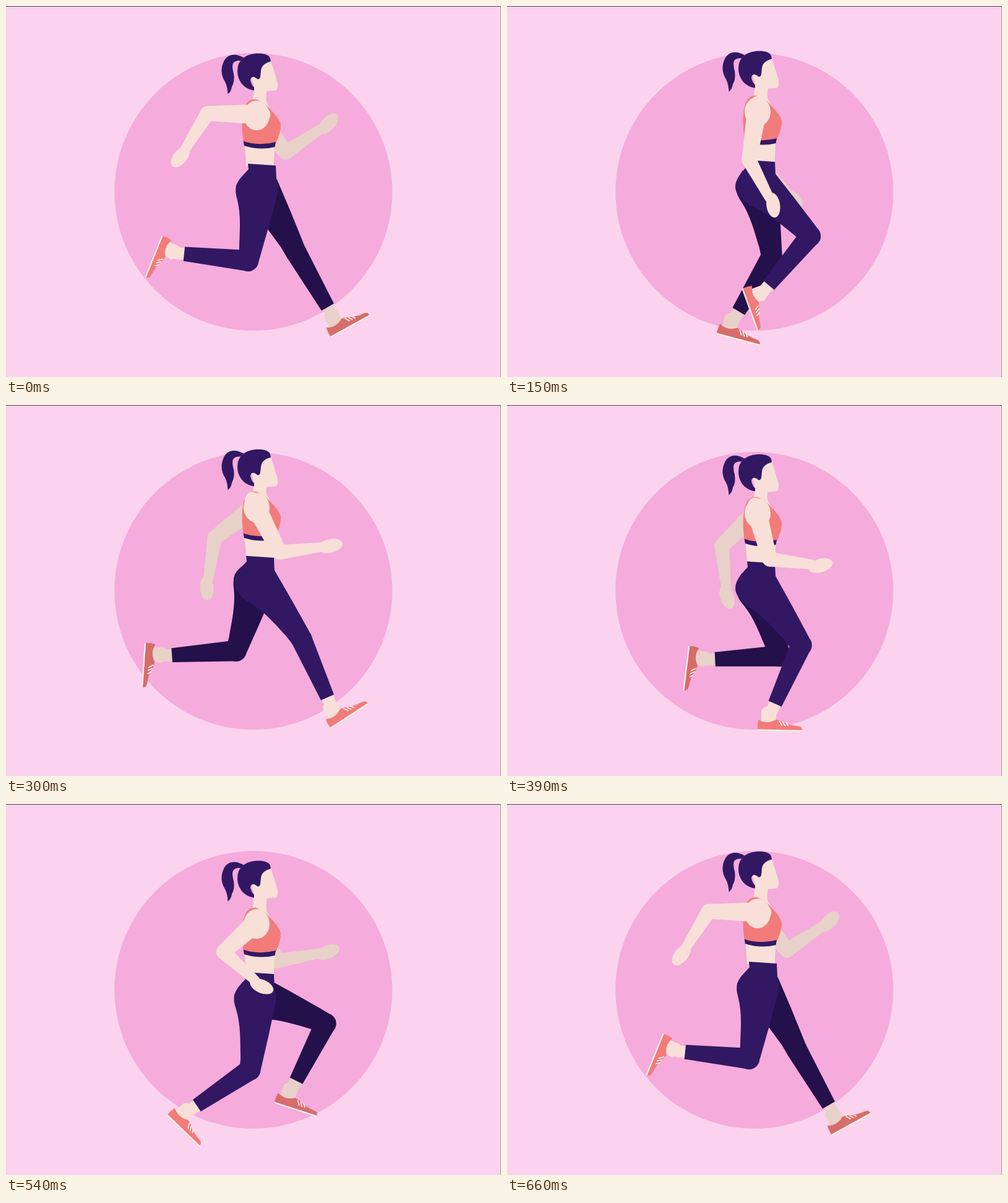
These frames come from a looping animation (800 by 600 pixels, 690 ms). An HTML page:

```html
<!DOCTYPE html>
<html lang="en">
<head>
<meta charset="utf-8">
<title>Runner</title>
<style>
html, body { margin: 0; width: 100%; height: 100%; overflow: hidden; background: #fcd3ee; }
svg { display: block; width: 800px; height: 600px; }
</style>
</head>
<body>
<svg id="stage" viewBox="0 0 800 600"></svg>
<script>
const STEP = 30, LOOP = 690, CYCLE = 22;
const NAVY = '#321863', DARK = '#24104b', CORAL = '#f17c79', CLAY = '#d66d6a',
      SKIN = '#f8e0d8', SHADE = '#e8d1c9', CREAM = '#fdf1ec';
const THIGH = 120, SHANK = 104, ANKLE = 124, FOREARM = 83;

// Key poses of one stride, in steps.
const KEYS = [0, 2, 5, 7, 10, 13, 18], N = KEYS.length;
const keyTime = i => KEYS[(i + N) % N] + CYCLE * Math.floor(i / N);

// Smooth periodic curve through one value per key pose; never overshoots.
function track(...values) {
  const value = i => values[(i + N) % N];
  const rise = i => (value(i + 1) - value(i)) / (keyTime(i + 1) - keyTime(i));
  const slope = i => {
    const a = rise(i - 1), b = rise(i);
    return a * b > 0 ? 2 * a * b / (a + b) : 0;
  };
  return t => {
    const i = KEYS.findLastIndex(k => k <= t);
    const h = keyTime(i + 1) - keyTime(i), u = (t - keyTime(i)) / h, w = 1 - u;
    return value(i) * w * w * (1 + 2 * u) + value(i + 1) * u * u * (3 - 2 * u)
      + h * u * w * (w * slope(i) - u * slope(i + 1));
  };
}

const wave = (t, peak) => Math.cos(2 * Math.PI * (t - peak) / CYCLE);

const headY = track(76.5, 85.5, 72.5, 68, 71.5, 79.5, 91.5);
const waistY = track(255, 273, 249, 241, 244, 253, 272);
const hipX = t => 405 + 3 * wave(t, 0) ** 12 * (wave(t, 0) > 0);

// Limb angles in degrees: 0 hangs down, positive swings forward. Feet: 0 is flat.
const nearLeg = {
  thigh: track(-8, -2, 45, 66, 37, 36, -5),
  shank: track(-96, -84, -40, -21, 24, -24, -56),
  foot: track(112, 110, 70, 20, -33, 1, 44)
};
const farLeg = {
  thigh: track(30, 47, 11, -4, -16, 17, 68),
  shank: track(30, -13, -31, -54, -86, -87, -27),
  foot: track(-29, 0, 15, 44, 94, 97, 18)
};
const nearArm = {
  upper: track(-91, -46, -9, 8, 27, 15, -48),
  fore: track(-32, -8, 28, 58, 97, 83, 48),
  wrist: t => 3 - 24 * wave(t, 4)
};
const farArm = {
  upper: track(38, 30, 1, -22, -53, -46, 29),
  fore: track(124, 97, 42, 20, -9, 6, 100),
  wrist: () => 13
};

const shape = (fill, d) => `<path fill="${fill}" d="${d}"/>`;
const line = (width, d) => `<path fill="none" stroke="${CREAM}" stroke-width="${width}" d="${d}"/>`;
const part = (id, body) => `<g id="${id}">${body}</g>`;
const taper = (fill, top, end, size) =>
  shape(fill, `M${-top},0 L${-end},${size} H${end} L${top},0Z`);

function legMarkup(id, pants, skin, shoe) {
  return part(id + 'Calf', taper(skin, 11, 9.5, ANKLE))
    + part(id + 'Foot',
      shape(skin, 'M-14,13 V-6 Q-11,-14 -4,-14 L11,-3 Q9,4 11,10 L0,18Z')
      + shape(shoe, 'M-18.5,8 Q-20.5,16 -19.5,25 H52 Q54,18 45,17 C34,16 24,13 18,9 L10,7 Q-4,16 -18.5,8Z')
      + line(2.2, 'M-19.5,24.6 H52.5')
      + line(1.8, 'M15,9 l5,8 m.5,-6.5 l4.5,7 m1,-6 l4,6'))
    + part(id + 'Shank', taper(pants, 17, 11.5, SHANK))
    + part(id + 'Thigh',
      shape(pants, 'M31,-8 L32,5 Q25.5,62 17,120 A17,17 0 0 1 -17,121 V103 C-20,76 -21,50 -31,25 Q-37,12 -36,2 Q-34,-9 -20,-25Z'));
}

function armMarkup(id, skin) {
  return part(id + 'Upper', taper(skin, 16, 12, 80) + `<ellipse rx="16" ry="24" fill="${skin}"/>`)
    + part(id + 'Fore', `<circle r="12" fill="${skin}"/>` + taper(skin, 12, 7.5, 72))
    + part(id + 'Hand', `<ellipse rx="11" ry="20" fill="${skin}"/>`);
}

const stage = document.getElementById('stage');
stage.innerHTML =
  '<rect width="800" height="600" fill="#fcd3ee"/>'
  + '<circle cx="399.8" cy="300.5" r="224.5" fill="#f5abdc"/>'
  + armMarkup('farArm', SHADE)
  + legMarkup('farLeg', DARK, SHADE, CLAY)
  + `<path id="neck" fill="${SKIN}"/>`
  + part('torso',
    shape(SKIN, 'M384,-40 H436 Q433,-22 433,4 H388 Q387,-20 384,-40Z')
    + shape(CORAL, 'M384,-35 C380,-60 381,-87 389,-98 Q397,-107 407,-103 Q419,-98 427,-88 Q440,-75 444,-64 Q445,-52 436,-33 Q410,-27 384,-35Z')
    + shape(NAVY, 'M383.5,-36.5 Q408,-28 436,-35 L434.5,-27 Q410,-21 385,-29Z')
    + `<ellipse cx="405" cy="-78" rx="21" ry="24" fill="${SKIN}"/>`)
  + part('head',
    shape(SKIN, 'M396,36 L410,18 L428,12 Q434,30 439,48 Q440,60 435,60 L422,61 L402,58Z')
    + shape(NAVY, 'M383,8 C394,-2.5 424,-2.5 427,8 L428,13 C418,16 413,20 412,28 L411,38 Q410,42 407,42 L404,40 C398,35 393,41 396,47 Q398,53 401,55 V60 C385,58 374,45 374,28 Q374,15 383,8Z')
    + shape(NAVY, 'M384,7 C370,-1 358,1 352,13 C347,24 347,35 354,46 Q358,54 358.5,66 Q364,62 365,54 Q370,46 368,33 C365,20 364,11 379,12Z'))
  + legMarkup('nearLeg', NAVY, SKIN, CORAL)
  + part('pelvis', shape(NAVY, 'M-17,-38 L28,-35 L29,-14 Q33,10 15,25 L-15,30 Q-36,20 -36,6 C-36,-8 -26,-18 -16,-29Z'))
  + armMarkup('nearArm', SKIN)
  + '<rect width="800" height="1" fill="#4d3d4a"/>'
  + '<rect x="799" width="1" height="600" fill="#a893a3"/>';

const parts = {};
stage.querySelectorAll('[id]').forEach(el => parts[el.id] = el);

const place = (id, [x, y], turn = 0, stretch = 1) =>
  parts[id].setAttribute('transform', `translate(${x} ${y}) rotate(${turn}) scale(1 ${stretch})`);

function along([x, y], deg, size) {
  const a = deg * Math.PI / 180;
  return [x + size * Math.sin(a), y + size * Math.cos(a)];
}

function poseLeg(id, leg, hip, t) {
  const thigh = leg.thigh(t), shank = leg.shank(t);
  const knee = along(hip, thigh, THIGH);
  place(id + 'Thigh', hip, -thigh);
  place(id + 'Shank', knee, -shank);
  place(id + 'Calf', knee, -shank);
  place(id + 'Foot', along(knee, shank, ANKLE), leg.foot(t));
}

// The upper arm shortens a little as the body sinks.
function poseArm(id, arm, shoulder, t) {
  const upper = arm.upper(t), fore = arm.fore(t);
  const size = 157 - 0.45 * shoulder[1];
  const elbow = along(shoulder, upper, size);
  place(id + 'Upper', shoulder, -upper, size / 80);
  place(id + 'Fore', elbow, -fore);
  place(id + 'Hand', along(elbow, fore, FOREARM), -fore - arm.wrist(t));
}

function pose(t) {
  const h = headY(t), w = waistY(t);
  const hip = [hipX(t), w + 38], shoulder = [404, w - 80];
  place('head', [0, h]);
  place('torso', [0, w]);
  place('pelvis', hip);
  parts.neck.setAttribute('d',
    `M401,${h + 50} L422,${h + 58} Q420,${w - 109} 421,${w - 99} L428,${w - 86} L420,${w - 60} L394,${w - 80} Q400,${w - 100} 401,${h + 50}Z`);
  poseLeg('farLeg', farLeg, hip, t);
  poseLeg('nearLeg', nearLeg, hip, t);
  poseArm('farArm', farArm, shoulder, t);
  poseArm('nearArm', nearArm, shoulder, t);
}

const start = performance.now();
let shown = -1;
function tick() {
  const step = Math.floor(((performance.now() - start) % LOOP) / STEP);
  if (step !== shown) pose((shown = step) % CYCLE);
  requestAnimationFrame(tick);
}
tick();
</script>
</body>
</html>
```
